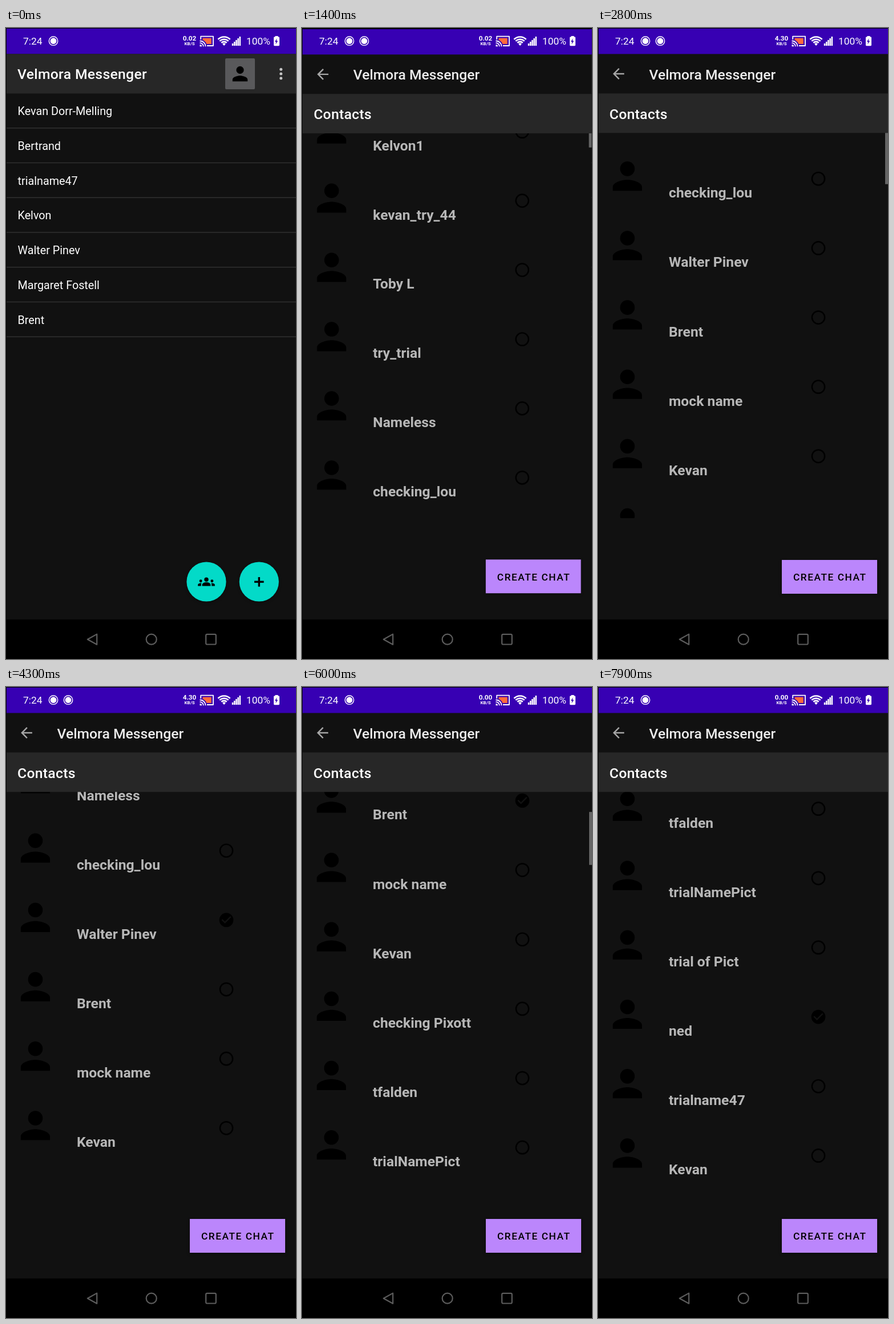
Animation of 508x1102 px, one loop 8000 ms. Source, as an HTML page with a canvas:

```html
<!DOCTYPE html>
<html lang="en">
<head>
<meta charset="utf-8">
<title>Velmora Messenger</title>
<style>
html, body { margin: 0; width: 100%; height: 100%; overflow: hidden; background: #000; }
canvas { display: block; width: 508px; height: 1102px; }
</style>
</head>
<body>
<canvas id="stage" width="508" height="1102"></canvas>
<script>
const ctx = document.getElementById('stage').getContext('2d');
const W = 508, H = 1102, LOOP = 8000;
const DP = 1.235;
const BG = '#111', BAR = '#272727', PURPLE = '#3700b3', TEAL = '#03dac8';
const APP = 'Velmora Messenger';

const chats = ['Kevan Dorr-Melling', 'Bertrand', 'trialname47', 'Kelvon',
  'Walter Pinev', 'Margaret Fostell', 'Brent'];
const contacts = ['Kelvon1', 'kevan_try_44', 'Toby L', 'try_trial', 'Nameless',
  'checking_lou', 'Walter Pinev', 'Brent', 'mock name', 'Kevan',
  'checking Pixott', 'tfalden', 'trialNamePict', 'trial of Pict', 'ned',
  'trialname47', 'Kevan'];

// contact index -> time it gets ticked
const ticks = { 6: 3900, 7: 4600, 14: 7400 };
// [time, scroll offset]
const scrollKeys = [[1700, 0], [2150, 270], [2800, 522.5], [3000, 522.5], [3300, 500],
  [4850, 500], [5100, 562.5], [5800, 829.6], [6000, 829.6], [6900, 1300]];
const scrolling = [[1100, 3300], [4850, 6900]];
const OPEN = 1100, OPEN_MS = 450;

const icon = {
  person: new Path2D('M12 12a4 4 0 1 0 0-8 4 4 0 0 0 0 8zm0 2c-2.67 0-8 1.34-8 4v2h16v-2c0-2.66-5.33-4-8-4z'),
  back: new Path2D('M20 11H7.83l5.59-5.59L12 4l-8 8 8 8 1.41-1.41L7.83 13H20z'),
  ring: new Path2D('M12 2a10 10 0 1 0 0 20 10 10 0 0 0 0-20zm0 18a8 8 0 1 1 0-16 8 8 0 0 1 0 16z'),
  ticked: new Path2D('M12 2a10 10 0 1 0 0 20 10 10 0 0 0 0-20zm-2 15l-5-5 1.41-1.41L10 14.17l7.59-7.59L19 8z'),
  middle: new Path2D('M12 6a3 3 0 1 0 0 6 3 3 0 0 0 0-6zM6 18v-1.6c0-2.5 3.5-3.65 6-3.65s6 1.15 6 3.65V18z'),
  side: new Path2D('M4 9a2 2 0 1 0 0 4 2 2 0 0 0 0-4zM0 18v-1.6C0 14.8 2.2 14 4 14c.4 0 .8 0 1.13.1-.4.7-.63 1.5-.63 2.3V18z'),
  bolt: new Path2D('M474.6 18l-3.6 6.2h2.2l-.8 4.4 3.9-6.2h-2.4z')
};

const clamp = v => Math.max(0, Math.min(1, v));

function rect(x, y, w, h, color) {
  ctx.fillStyle = color;
  ctx.fillRect(x, y, w, h);
}

function disc(x, y, r, color) {
  ctx.fillStyle = color;
  ctx.beginPath();
  ctx.arc(x, y, r, 0, 7);
  ctx.fill();
}

function circle(x, y, r, color, width) {
  ctx.strokeStyle = color;
  ctx.lineWidth = width;
  ctx.beginPath();
  ctx.arc(x, y, r, 0, 7);
  ctx.stroke();
}

function text(str, x, y, size, weight, color, spacing = 0, align = 'left') {
  ctx.font = `${weight} ${size}px Roboto, sans-serif`;
  ctx.letterSpacing = spacing + 'px';
  ctx.textAlign = align;
  ctx.fillStyle = color;
  ctx.fillText(str, x, y);
}

// 24-unit icon centred at x, y
function glyph(path, x, y, scale, color, flip = 1) {
  ctx.save();
  ctx.translate(x, y);
  ctx.scale(scale * flip, scale);
  ctx.translate(-12, -12);
  ctx.fillStyle = color;
  ctx.fill(path);
  ctx.restore();
}

function withShadow(draw) {
  ctx.save();
  ctx.shadowColor = 'rgba(0,0,0,.35)';
  ctx.shadowBlur = 5;
  ctx.shadowOffsetY = 2;
  draw();
  ctx.restore();
}

function pageBase() {
  rect(0, 0, W, 1033, BG);
  rect(0, 0, W, 45.4, PURPLE);
  rect(0, 0, W, 1, '#000');
}

function drawHome() {
  pageBase();
  rect(0, 45.4, W, 69, BAR);
  text(APP, 20, 89, 24.7, 500, '#fff', 0.31);
  ctx.fillStyle = '#59595b';
  ctx.beginPath();
  ctx.roundRect(384, 53, 52, 54, 2);
  ctx.fill();
  glyph(icon.person, 410, 80, 1.65, '#000');
  for (const y of [72.3, 80, 87.7]) disc(481.7, y, 2.5, '#c4c4c4');

  chats.forEach((name, i) => {
    text(name, 20.5, 152 + 60.75 * i, 19.76, 400, '#fff');
    rect(0, 174 + 60.75 * i, W, 1.4, '#323232');
  });

  for (const x of [351, 443.3]) withShadow(() => disc(x, 967, 34.6, TEAL));
  glyph(icon.middle, 351, 967, DP, '#000');
  glyph(icon.side, 351, 967, DP, '#000');
  glyph(icon.side, 351, 967, DP, '#000', -1);
  rect(435, 965.5, 16.6, 3.4, '#000');
  rect(441.6, 959, 3.4, 16.6, '#000');
}

function scrollAt(t) {
  let [t0, s0] = scrollKeys[0];
  for (const [t1, s1] of scrollKeys) {
    if (t < t1) {
      const p = clamp((t - t0) / (t1 - t0));
      return s0 + (s1 - s0) * p * (2 - p);
    }
    t0 = t1;
    s0 = s1;
  }
  return s0;
}

function thumbAlpha(t) {
  return Math.max(...scrolling.map(([a, b]) => t < a ? 0 : clamp((b + 550 - t) / 250)));
}

function drawContacts(t) {
  const scroll = scrollAt(t);
  pageBase();
  glyph(icon.back, 36, 80, DP, '#a6a6a6');
  text(APP, 89.5, 89.5, 24.7, 500, '#ececec');

  ctx.save();
  ctx.beginPath();
  ctx.rect(0, 183, W, 673);
  ctx.clip();
  contacts.forEach((name, i) => {
    const y = 180 + 121.15 * i - scroll;
    if (y < 100 || y > 920) return;
    glyph(icon.person, 51.5, y - 4.6, 3.2, '#000');
    text(name, 124, y + 33, 24.7, 700, '#b7b7b7');
    glyph(t >= ticks[i] ? icon.ticked : icon.ring, 386, y, DP, '#000');
  });
  ctx.globalAlpha *= thumbAlpha(t);
  rect(503, 115.5 + scroll * 0.1238, 5, 92.5, '#666');
  ctx.restore();

  rect(0, 114.3, W, 69, BAR);
  text('Contacts', 20, 158.5, 24.7, 500, '#fff', 0.31);
  withShadow(() => rect(322, 929, 167, 59, '#bb86fc'));
  text('CREATE CHAT', 342, 965.3, 17.3, 500, '#000', 1.54);
}

function drawStatus(t) {
  const white = '#fff';
  text('7:24', 30, 28.5, 17.4, 400, white);
  const dots = t >= 700 && t < 4750 ? [83, 109] : [83];
  for (const x of dots) {
    circle(x, 22.7, 7.7, white, 1.4);
    disc(x, 22.7, 5.4, white);
  }
  const rate = t < 1750 ? '0.02' : t < 4750 ? '4.30' : '0.00';
  text(rate, 321.5, 22, 11.8, 700, white, 0, 'center');
  text('KB/S', 321.5, 30, 8, 700, white, 0, 'center');

  // cast
  ctx.strokeStyle = white;
  ctx.lineWidth = 1.8;
  ctx.strokeRect(341.2, 14.6, 21.8, 16.4);
  rect(344.5, 17.7, 15.3, 10.2, '#ff6a3a');
  ctx.save();
  ctx.beginPath();
  ctx.rect(339.5, 19.5, 13.5, 12.8);
  ctx.clip();
  disc(340, 32, 12, PURPLE);
  for (const r of [9.5, 5.8]) circle(340, 32, r, white, 1.8);
  disc(340, 32, 3, white);
  ctx.restore();

  // wifi
  ctx.strokeStyle = white;
  ctx.lineWidth = 2.6;
  for (const r of [15, 10.8, 6.6]) {
    ctx.beginPath();
    ctx.arc(382, 30.5, r, -Math.PI * 0.75, -Math.PI * 0.25);
    ctx.stroke();
  }
  ctx.fillStyle = white;
  ctx.beginPath();
  ctx.moveTo(382, 31);
  ctx.arc(382, 30.5, 4, -Math.PI * 0.75, -Math.PI * 0.25);
  ctx.fill();

  for (let i = 0; i < 5; i++) {
    const h = 4 + i * 3;
    rect(395.8 + i * 3.2, 31 - h, 2.5, h, white);
  }
  text('100%', 421, 28.5, 17.4, 400, white);
  rect(471.5, 14, 5, 3, white);
  ctx.fillStyle = white;
  ctx.beginPath();
  ctx.roundRect(469, 15.6, 10, 15.6, 1.4);
  ctx.fill();
  ctx.fillStyle = PURPLE;
  ctx.fill(icon.bolt);
}

function drawNav() {
  rect(0, 1033, W, 69, '#000');
  ctx.strokeStyle = '#5c5c5c';
  ctx.lineWidth = 2.2;
  ctx.lineJoin = 'round';
  ctx.beginPath();
  ctx.moveTo(142.8, 1067.7);
  ctx.lineTo(159.2, 1058.6);
  ctx.lineTo(159.2, 1076.8);
  ctx.closePath();
  ctx.stroke();
  circle(254.7, 1067.7, 9, '#5c5c5c', 2.2);
  ctx.beginPath();
  ctx.roundRect(350.2, 1058.9, 17.6, 17.6, 2);
  ctx.stroke();
}

function draw(t) {
  const p = clamp((t - OPEN) / OPEN_MS);
  if (p < 1) drawHome();
  if (p > 0) {
    const scale = 1 - 0.15 * (1 - p) ** 4;
    ctx.save();
    ctx.globalAlpha = clamp((t - OPEN - 20) / 100);
    ctx.translate(W / 2, H / 2);
    ctx.scale(scale, scale);
    ctx.translate(-W / 2, -H / 2);
    drawContacts(t);
    ctx.restore();
  }
  drawStatus(t);
  drawNav();
  rect(0, 0, 1, H, '#000');
}

let start;
function tick(now) {
  start ??= now;
  draw((now - start) % LOOP);
  requestAnimationFrame(tick);
}
draw(0);
requestAnimationFrame(tick);
</script>
</body>
</html>
```
